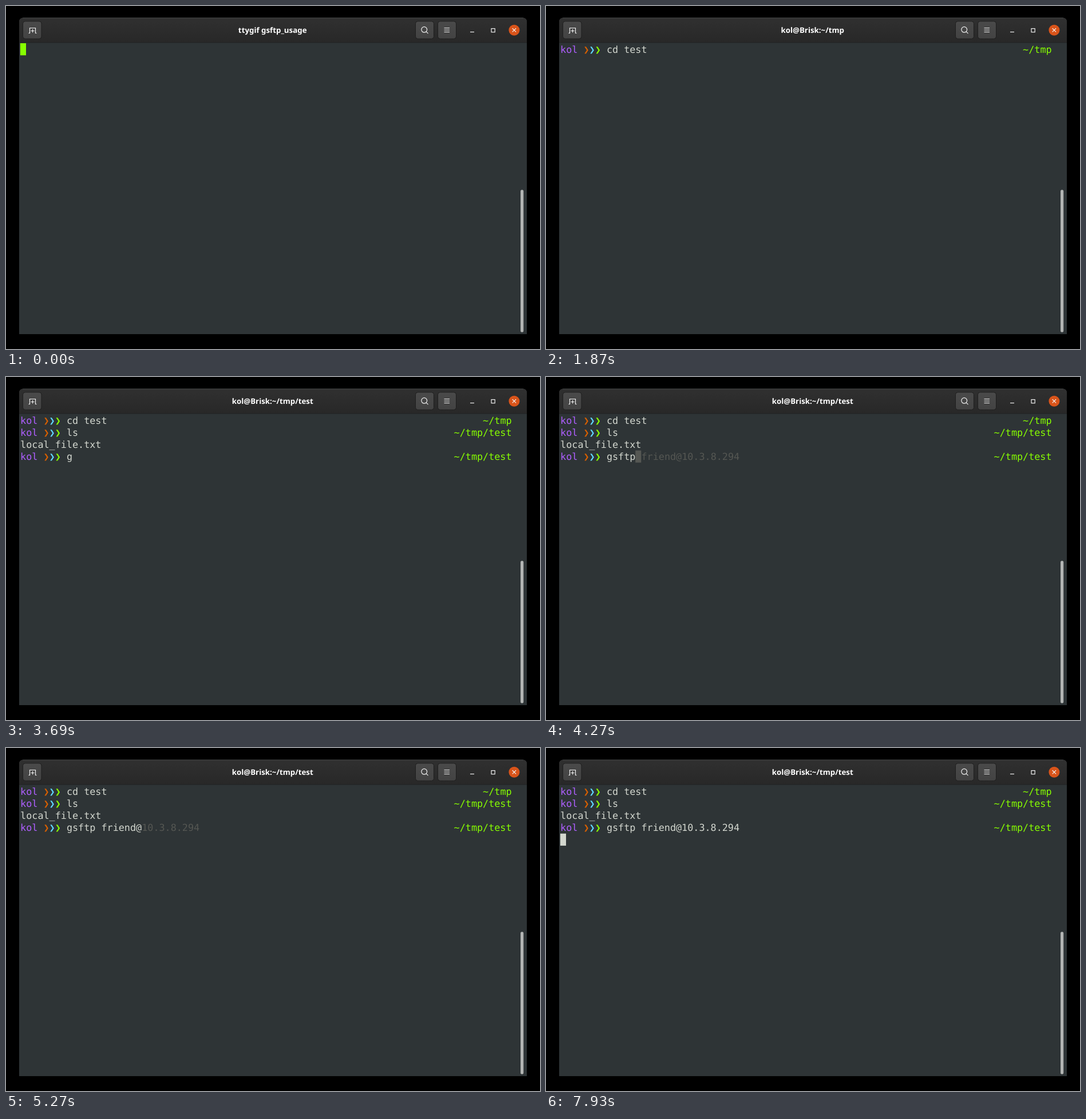
These frames come from a looping animation (933x600 px, 8000 ms). An HTML page:

```html
<!DOCTYPE html>
<html lang="en">
<head>
<meta charset="utf-8">
<title>Terminal</title>
<style>
  html, body { margin: 0; width: 100%; height: 100%; overflow: hidden; background: #000; }
  svg { display: block; width: 933px; height: 600px; }
  text { white-space: pre; text-rendering: geometricPrecision; }
  #screen { font: 16.78px "DejaVu Sans Mono", monospace; }
  #title { font: bold 13.3px "Noto Sans", "Open Sans", sans-serif; fill: #fff; text-anchor: middle; }
  .icon { fill: none; stroke: #f0f0f0; stroke-width: 1.2; }
</style>
</head>
<body>
<svg viewBox="0 0 933 600">
  <defs>
    <linearGradient id="bar" x2="0" y2="1">
      <stop stop-color="#303030"/><stop offset="1" stop-color="#282828"/>
    </linearGradient>
    <linearGradient id="button" x2="0" y2="1">
      <stop stop-color="#4a4a4a"/><stop offset="1" stop-color="#434343"/>
    </linearGradient>
  </defs>
  <rect width="933" height="600"/>
  <path d="M23 574V28q0-7.500 7.500-7.500H902.500q7.500 0 7.500 7.500V574z" fill="#2e3436"/>
  <path d="M23 64V28q0-7.500 7.500-7.500H902.500q7.500 0 7.500 7.500V64z" fill="url(#bar)"/>
  <path d="M29 21.200H904" stroke="#404040"/>
  <path d="M23 64H910" stroke="#202222"/>
  <g fill="url(#button)" stroke="#1e1e1e">
    <rect x="29.500" y="26.800" width="32.500" height="30.500" rx="4"/>
    <rect x="715.500" y="26.800" width="32" height="30.500" rx="4"/>
    <rect x="754.500" y="26.800" width="32" height="30.500" rx="4"/>
  </g>
  <g class="icon">
    <path d="M39.500 47.500H41.500V38.500H51.500V47.500H53.500M46.500 40.500V46.500M43.500 43.500H49.500"/>
    <circle cx="730.700" cy="41.300" r="4.900"/>
    <path d="M734.200 44.800L737.500 48.100"/>
    <path d="M765.500 38.500H775M765.500 42H775M765.500 45.500H775"/>
    <path d="M811 45.500H818"/>
    <rect x="848" y="39.500" width="6.200" height="6.200"/>
  </g>
  <circle cx="887.900" cy="42.200" r="9.500" fill="#d9541a"/>
  <path class="icon" d="M884.700 39L891.100 45.400M891.100 39L884.700 45.400"/>
  <rect x="899" y="321.500" width="5.200" height="249" rx="2.600" fill="#b2b4b3"/>
  <text id="title" x="465.700" y="46.700"></text>
  <g id="screen"></g>
</svg>
<script>
const DURATION = 8000;
const CELL = { x: 24.9, y: 65.1, w: 10.1, h: 21.15 };
const INK = {
  text: '#d3d7cf', dim: '#555753', back: '#2e3436',
  purple: '#af5fff', orange: '#d75f00', blue: '#5fd7ff', lime: '#87ff00'
};
const USER = 'kol', HOST = 'Brisk';
const PROMPT_COLS = 8, RIGHT_COL = 85;

// Evenly spaced key times from a to b.
const spread = (a, b, n) => Array.from({ length: n }, (_, i) => a + (b - a) * i / (n - 1));

const commands = [
  { row: 0, start: 60, done: 1870, path: '~/tmp', text: 'cd test', hintFrom: 2,
    keys: [750, 910, 1060, 1210, 1380, 1550, 1720] },
  { row: 1, start: 1910, done: 2420, path: '~/tmp/test', text: 'ls', hintFrom: 2,
    keys: [2150, 2320] },
  { row: 3, start: 2440, done: 7930, path: '~/tmp/test', text: 'gsftp friend@10.3.8.294', hintFrom: 2,
    keys: [3690, 3870, 3970, ...spread(4150, 4700, 6), ...spread(4850, 5010, 3), 5270, 5540, 5620,
      5860, 6100, 6320, 6550, 6760, 7080, 7450, 7630] }
];
const cursorShown = [[0, 1870], [3970, 5010], [7450, DURATION]];

const title = document.getElementById('title');
const screen = document.getElementById('screen');

const put = (col, row, str, fill, weight = 'normal') =>
  `<text x="${CELL.x + 0.2 + col * CELL.w}" y="${81.5 + row * CELL.h}" fill="${fill}" font-weight="${weight}">${str}</text>`;

const block = (col, row, fill) =>
  `<rect x="${CELL.x + col * CELL.w}" y="${CELL.y + row * CELL.h}" width="${CELL.w}" height="${CELL.h}" fill="${fill}"/>`;

function drawCommand({ row, start, done, path, text, hintFrom, keys }, t, cursorOn) {
  if (t < start) return '';
  const count = keys.filter(k => t >= k).length;
  const col = PROMPT_COLS + count;
  const hint = count >= hintFrom ? text.slice(count) : '';
  let out = put(0, row, USER, INK.purple);
  [INK.orange, INK.blue, INK.lime].forEach((ink, i) => out += put(4 + i, row, '❯', ink, 'bold'));
  out += put(PROMPT_COLS, row, text.slice(0, count), INK.text);
  out += put(RIGHT_COL - path.length, row, path, INK.lime);
  if (cursorOn && t < done) {
    out += block(col, row, hint ? INK.dim : INK.text);
    out += put(col, row, hint.slice(0, 1), INK.back) + put(col + 1, row, hint.slice(1), INK.dim);
  } else {
    out += put(col, row, hint, INK.dim);
  }
  return out;
}

function titleAt(t) {
  if (t < 60) return 'ttygif gsftp_usage';
  return `${USER}@${HOST}:${t < 1890 ? '~/tmp' : '~/tmp/test'}`;
}

let shown = '';
function render(t) {
  const cursorOn = cursorShown.some(([a, b]) => t >= a && t < b);
  let out = commands.map(c => drawCommand(c, t, cursorOn)).join('');
  if (t < 60) out += block(0, 0, INK.lime);
  if (t >= 2420) out += put(0, 2, 'local_file.txt', INK.text);
  if (t >= 7930) out += block(0, 4, INK.text);
  if (out === shown) return;
  shown = out;
  screen.innerHTML = out;
}

const origin = performance.now();
function tick() {
  const t = (performance.now() - origin) % DURATION;
  title.textContent = titleAt(t);
  render(t);
  requestAnimationFrame(tick);
}
tick();
</script>
</body>
</html>
```
